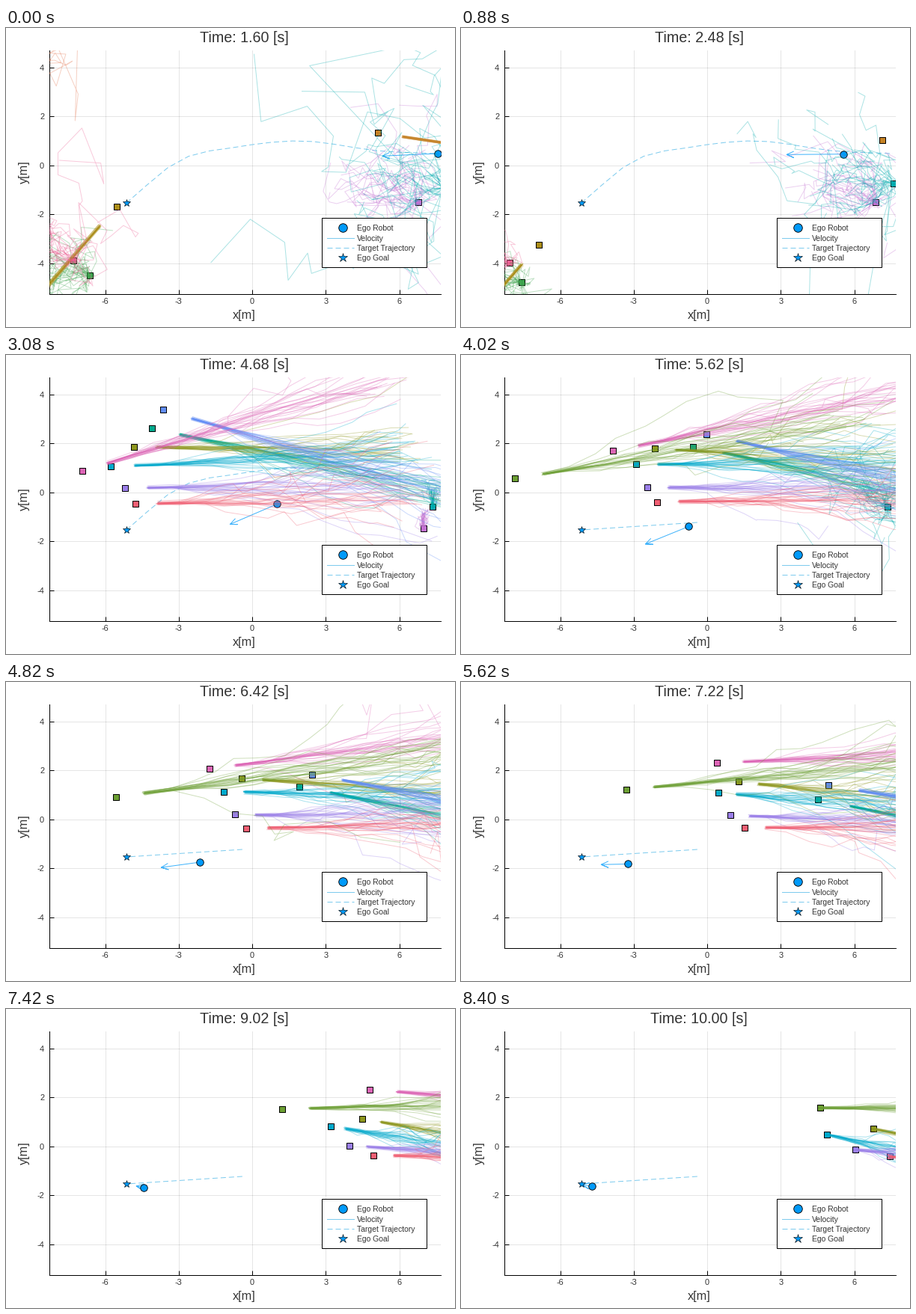
These frames come from a looping animation (600 px wide and 400 px high, 8.42 s). A matplotlib script:

```python
import numpy as np
import matplotlib.pyplot as plt
from matplotlib.animation import FuncAnimation
from matplotlib.collections import LineCollection
from matplotlib.colors import to_rgba
from matplotlib.patches import Rectangle

FRAMES, INTERVAL = 421, 20
HOLD = 20                 # frames between two observations of the pedestrians
SAMPLES, HORIZON = 25, 12
SPAN = 7                  # observations between two waypoints of a walker
PX = 0.72                 # points per pixel at 100 dpi
BLUE, PALE, INK = "#009AFA", "#7dcbee", "#333333"
GOAL = (161, 234)

plt.rcParams["font.family"] = "Liberation Sans"

# All coordinates are stage pixels with y pointing down.
fig = plt.figure(figsize=(6, 4), dpi=100, facecolor="white")
ax = fig.add_axes([58 / 600, 1 - 356 / 400, 523 / 600, 326 / 400])
ax.set_xlim(58, 581)
ax.set_ylim(356, 30)
ax.set_xticks(329 + 32.75 * np.arange(-6, 7, 3), ["-6", "-3", "0", "3", "6"])
ax.set_yticks(184 - 32.75 * np.arange(-4, 5, 2), ["-4", "-2", "0", "2", "4"])
ax.tick_params(direction="in", length=6 * PX, width=PX, labelsize=11 * PX,
               labelcolor=INK, pad=5 * PX)
ax.tick_params(axis="y", pad=7 * PX)
ax.grid(color="black", alpha=0.1, lw=PX)
ax.set_axisbelow(True)
for side, spine in ax.spines.items():
    spine.set_visible(side in ("left", "bottom"))
    spine.set_linewidth(PX)


def label(x, y, text, size, **kw):
    kw = {"ha": "center", "va": "center", "color": INK, "zorder": 9, **kw}
    return ax.text(x, y, text, fontsize=size * PX, **kw)


def line(xs, ys, color, **kw):
    return ax.plot(xs, ys, color=color, lw=PX, **kw)[0]


def mark(x, y, shape, size, z):
    edge = 0.6 if shape == "*" else 0.9
    return ax.plot([x], [y], shape, ms=size * PX, mfc=BLUE, mec="black",
                   mew=edge * PX, zorder=z)[0]


def spline(x, xs, ps):
    """Smooth curve through ps at xs, straight beyond both ends."""
    xs, ps = np.array(xs, float), np.array(ps, float)
    ms = np.gradient(ps, xs, axis=0)
    if x <= xs[0]:
        return ps[0] + (x - xs[0]) * ms[0]
    if x >= xs[-1]:
        return ps[-1] + (x - xs[-1]) * ms[-1]
    i = np.searchsorted(xs, x, side="right") - 1
    h = xs[i + 1] - xs[i]
    u = (x - xs[i]) / h
    return ((1 + 2 * u) * (1 - u) ** 2 * ps[i] + u * (1 - u) ** 2 * h * ms[i]
            + u * u * (3 - 2 * u) * ps[i + 1] + u * u * (u - 1) * h * ms[i + 1])


# ---- pedestrians ---------------------------------------------------------
people = []
ahead = np.arange(HORIZON)[:, None]


def add(color, first, last, place, predict):
    people.append((to_rgba(color), first, last, place, predict))


def wildness(rng):
    return np.exp(0.55 * rng.normal(size=(SAMPLES, 1, 1)))


def walker(color, a, b, c, start=SPAN, wide=1):
    """Parabola through three waypoints; predictions fan out along it."""
    a, b, c = np.array([a, b, c], float)

    def place(s):
        u = (s - start) / SPAN
        return a + u * (b - a) + u * (u - 1) / 2 * (c - 2 * b + a)

    def predict(s, rng):
        v = place(s + 1) - place(s)
        turn = 1.5 * np.maximum(ahead - 0.8, 0)
        turn = turn * rng.normal(size=(SAMPLES, 1, 2))
        shake = 0.65 * ahead * rng.normal(size=(SAMPLES, HORIZON, 2))
        noise = turn + shake.cumsum(axis=1)
        return (place(s + 1) + rng.normal(size=(SAMPLES, 1, 2)) + ahead * v
                + wide * wildness(rng) * noise)

    add(color, start - 2, 21, place, predict)


def stander(color, start, rest, wide, last):
    """Shuffles to a resting place; predictions are random walks."""
    start, rest = np.array([start, rest], float)

    def place(s):
        return rest + (start - rest) * max(1 - s / 4, 0)

    def predict(s, rng):
        pulse = np.cos(np.pi * s / 14) ** 2
        walk = rng.normal(size=(SAMPLES, HORIZON, 2))
        walk[:, 0] = 0
        return (place(s) + ahead * np.array([-6 * pulse, -2])
                + (wide * pulse + 1.2) * wildness(rng) * walk.cumsum(axis=1))

    add(color, 0, last, place, predict)


# in palette order, which is also the order of drawing
stander("#E36F47", (46, 44), (30, 30), 14, 2)
stander("#3EA44E", (111.5, 331), (50, 350), 9, 4)
stander("#C371D2", (550.5, 233.5), (558, 232.5), 11, 7)
walker("#AC8E18", (148, 239.5), (-7, 418), (-162, 597), start=0, wide=0.12)
stander("#00AAAE", (585, 213.5), (570, 203), 20, 11)
stander("#ED5E93", (89.5, 311), (40, 318), 8, 4)
walker("#C68225", (497, 140.5), (728, 175), (959, 210), start=0, wide=0.12)
walker("#00A98D", (194.5, 98), (476.5, 157), (800, 222))
walker("#8E971E", (171, 123), (370.5, 133.5), (550.5, 160.5))
walker("#00A9CC", (139.5, 149), (343.5, 148.5), (489, 168))
walker("#9B7FE9", (158.5, 178), (359.5, 178.5), (526.5, 188.5))
walker("#618DF6", (209.5, 73.5), (490.5, 138.5), (784, 168))
walker("#F05F73", (172.5, 199.5), (378.5, 195), (573, 197.5))
walker("#DD65B6", (102, 155), (342, 108.5), (597, 120))
walker("#6C9F33", (-40, 188), (221, 144.5), (480, 132.5))


def alive(step):
    return [(n, p) for n, p in enumerate(people)
            if p[1] <= step <= p[2] and 40 < p[3](step)[0] < 600]


def fans(step):
    lines, colors = [], []
    for n, (rgba, _, _, _, predict) in alive(step):
        lines.extend(predict(step, np.random.default_rng(50 * n + step)))
        colors += [rgba[:3] + (0.33,)] * SAMPLES
    return lines, colors


STEPS = (FRAMES - 1) // HOLD + 1
FANS = [fans(s) for s in range(STEPS)]
SPOTS = [([p[3](s) for _, p in alive(s)], [p[0] for _, p in alive(s)])
         for s in range(STEPS)]

# ---- robot ---------------------------------------------------------------
EGO_TIMES = (1.6, 3.42, 4.68, 5.62, 7.22, 8.08, 10)
EGO_SPOTS = [(577, 168), (442.5, 174), (362, 199.5), (304, 229.5),
             (223.5, 243.5), (199, 240.5), (174.5, 237)]
REPLAN_TIME = 5.42


def ego(t):
    return spline(t, EGO_TIMES, EGO_SPOTS)


plan_x = np.linspace(GOAL[0], 577, 16)
plan_y = [spline(x, (GOAL[0], 230, 310, 388, 505, 577),
                 (GOAL[1], 178, 159, 151, 165, 168)) for x in plan_x]
PLAN = np.column_stack([plan_x, plan_y])
REPLAN = np.array([ego(REPLAN_TIME), GOAL])


def arrow(p, v):
    tip = p + v
    back = -v / np.hypot(*v) * 10
    wings = []
    for turn in (0.42, -0.42):
        c, s = np.cos(turn), np.sin(turn)
        wings.append(tip + np.array([[c, -s], [s, c]]) @ back)
    return np.array([p, tip, wings[0], tip, wings[1]])


# ---- artists -------------------------------------------------------------
DASH = (0, (7, 4))
title = label(318, 19, "", 19.8, va="baseline")
label(318, 384.5, "x[m]", 16.2)
label(24.5, 193, "y[m]", 16.2, rotation=90)

plan = line([], [], PALE, ls=DASH, zorder=2)
heading = line([], [], BLUE, alpha=0.75, zorder=3)
robot = mark(0, 0, "o", 9.5, 4)
mark(*GOAL, "*", 11, 4)
squares = ax.scatter([], [], marker="s", s=(8 * PX) ** 2, ec="black",
                     lw=PX, zorder=4)
fan = LineCollection([], linewidths=PX, zorder=5)
ax.add_collection(fan, autolim=False)

ax.add_patch(Rectangle((422, 254.5), 140, 66, fc="white", ec="black",
                       lw=PX, zorder=7))
rows = 267.5 + 13.3 * np.arange(4)
mark(449.5, rows[0], "o", 11.5, 8)
line([429, 465], [rows[1]] * 2, PALE, zorder=8)
line([429, 465], [rows[2]] * 2, PALE, ls=DASH, zorder=8)
mark(449.5, rows[3], "*", 13, 8)
for y, name in zip(rows, ("Ego Robot", "Velocity", "Target Trajectory",
                          "Ego Goal")):
    label(469, y, name, 10.4, ha="left", va="center_baseline")


def update(i):
    t = 1.6 + 0.02 * i
    title.set_text(f"Time: {t:.2f} [s]")
    p = ego(t)
    robot.set_data([p[0]], [p[1]])
    heading.set_data(*arrow(p, (ego(t + 0.01) - ego(t - 0.01)) / 0.02).T)
    plan.set_data(*(PLAN if t < REPLAN_TIME - 1e-6 else REPLAN).T)
    spots, colors = SPOTS[i // HOLD]
    squares.set_offsets(spots)
    squares.set_facecolor(colors)
    # predictions lag the observation by one frame
    lines, colors = FANS[max(i - 1, 0) // HOLD]
    fan.set_segments(lines)
    fan.set_color(colors)
    return title, robot, heading, plan, squares, fan


anim = FuncAnimation(fig, update, frames=FRAMES, interval=INTERVAL,
                     repeat=True, repeat_delay=0)
plt.show()
```
